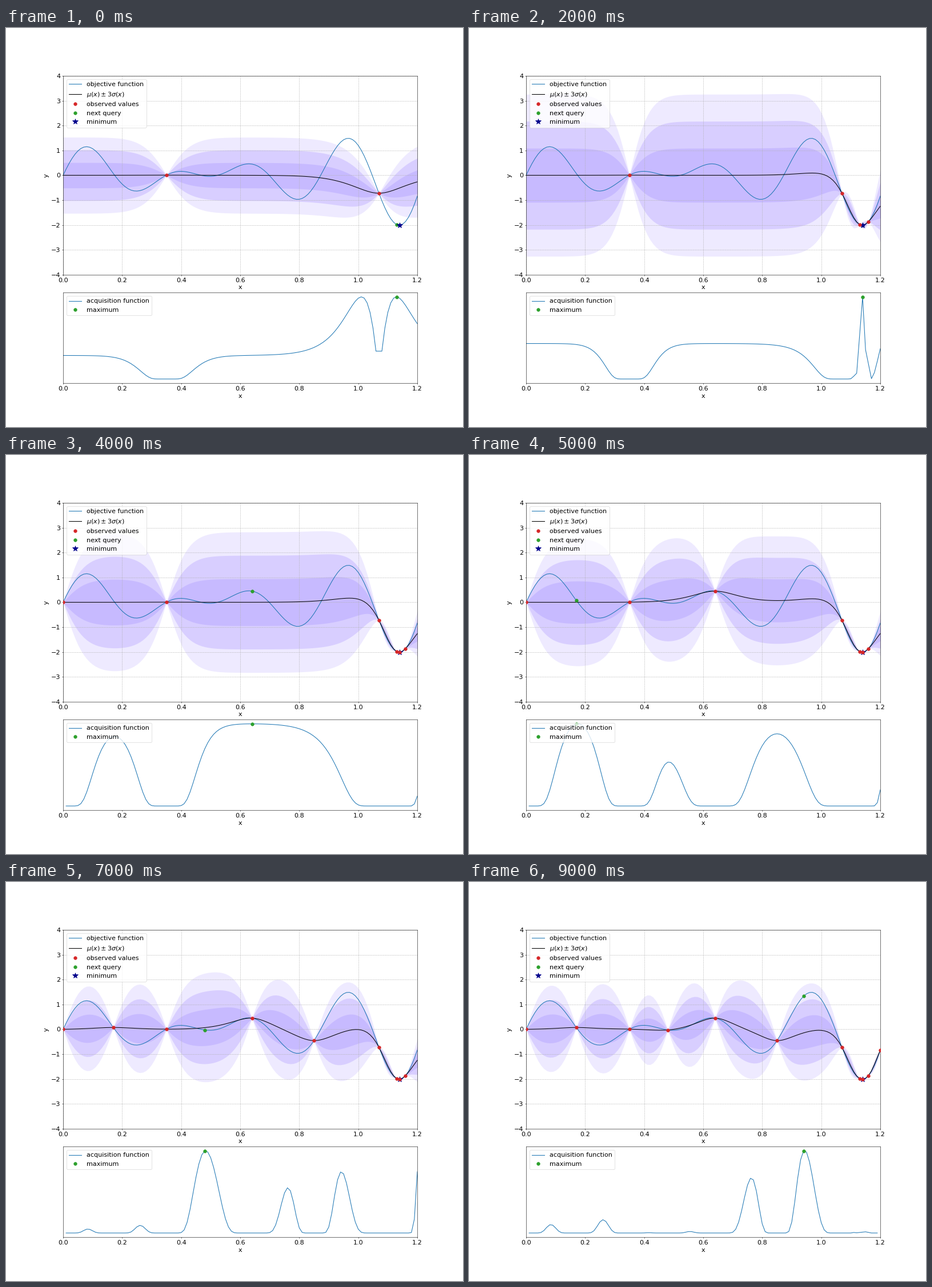
These frames come from a looping animation (800 px wide and 700 px high, 10 s). A matplotlib script:

```python
import math

import matplotlib.pyplot as plt
import numpy as np
from matplotlib.animation import FuncAnimation

plt.rcParams.update({
    "font.family": "DejaVu Sans",
    "font.size": 16,
    "axes.labelsize": 16,
    "legend.fontsize": 16,
})

XI = 0.005
X = np.linspace(0, 1.2, 121)
START = [0.35, 1.07]
QUERIES = [1.13, 1.16, 1.14, 0.0, 0.64, 0.17, 0.85, 0.48, 1.2, 0.94]
BANDS = [(3, "#eeeaff"), (2, "#d8ceff"), (1, "#c7baff")]


def objective(x):
    return (1.4 - 3 * x) * np.sin(18 * x)


def matern(a, b, scale):
    r = math.sqrt(5) * np.abs(a[:, None] - b[None, :]) / scale
    return (1 + r + r * r / 3) * np.exp(-r)


def gram(x, scale):
    return matern(x, x, scale) + 1e-10 * np.eye(len(x))


def fit_scale(x, y):
    """Length scale with the highest marginal likelihood."""
    if len(x) == 2:
        return 0.1  # two distant points say nothing about the scale

    def loss(scale):
        k = gram(x, scale)
        return len(x) * np.log(y @ np.linalg.solve(k, y)) + np.linalg.slogdet(k)[1]

    scales = np.geomspace(0.03, 0.3, 900)
    return scales[np.argmin([loss(s) for s in scales])]


def posterior(x, y):
    scale = fit_scale(x, y)
    k = gram(x, scale)
    cross = matern(X, x, scale)
    weights = np.linalg.solve(k, cross.T)
    amp = y @ np.linalg.solve(k, y) / len(x)
    var = amp * (1 - np.sum(cross.T * weights, axis=0))
    return weights.T @ y, np.sqrt(np.maximum(var, 1e-16))


def improvement(mu, sd, best):
    gain = best - mu - XI
    z = gain / sd
    cdf = np.array([0.5 * math.erfc(-v / math.sqrt(2)) for v in z])
    pdf = np.exp(-z * z / 2) / math.sqrt(2 * math.pi)
    return gain * cdf + sd * pdf


def solve_step(i):
    seen = np.array(START + QUERIES[:i])
    y = objective(seen)
    mu, sd = posterior(seen, y)
    free = np.abs(X[:, None] - seen).min(axis=1) > 1e-6
    acq = improvement(mu[free], sd[free], y.min())
    return seen, y, mu, sd, X[free], acq


STEPS = [solve_step(i) for i in range(len(QUERIES))]

fig = plt.figure(figsize=(16, 14), dpi=50)
grid = fig.add_gridspec(3, 1)
top = fig.add_subplot(grid[:2])
low = fig.add_subplot(grid[2])


def dots(ax, color, label, z):
    return ax.plot([], [], "o", color=color, ms=8, label=label, zorder=z)[0]


fills = [top.fill_between(X, 0 * X, 0 * X, color=c, lw=0) for _, c in BANDS]
top.plot(X, objective(X), color="C0", label="objective function")
mean, = top.plot([], [], color="black", label=r"$\mu(x) \pm 3\sigma(x)$")
observed = dots(top, "C3", "observed values", 5)
query = dots(top, "C2", "next query", 3)
x_min = X[np.argmin(objective(X))]
top.plot([x_min], [objective(x_min)], "*", color="darkblue", ms=15,
         ls="none", label="minimum", zorder=4)
top.set(xlim=(0, 1.2), ylim=(-4, 4), xlabel="x", ylabel="y")
top.grid(ls="--")
top.legend(loc="upper left")

curve, = low.plot([], [], color="C0", label="acquisition function")
peak = dots(low, "C2", "maximum", 3)
low.set(xlim=(0, 1.2), xlabel="x", yticks=[])
low.legend(loc="upper left")


def update(i):
    seen, y, mu, sd, xs, acq = STEPS[i]
    for fill, (n, _) in zip(fills, BANDS):
        upper = np.column_stack([X, mu + n * sd])
        lower = np.column_stack([X, mu - n * sd])
        fill.set_verts([np.vstack([upper, lower[::-1]])])
    mean.set_data(X, mu)
    observed.set_data(seen, y)
    q = QUERIES[i]
    query.set_data([q], [objective(q)])
    curve.set_data(xs, acq)
    peak.set_data([q], [acq[np.argmin(np.abs(xs - q))]])
    pad = 0.05 * np.ptp(acq)
    low.set_ylim(acq.min() - pad, acq.max() + pad)
    return [*fills, mean, observed, query, curve, peak]


anim = FuncAnimation(fig, update, frames=len(QUERIES), interval=1000,
                     repeat=True, repeat_delay=0, blit=False)
plt.show()
```
